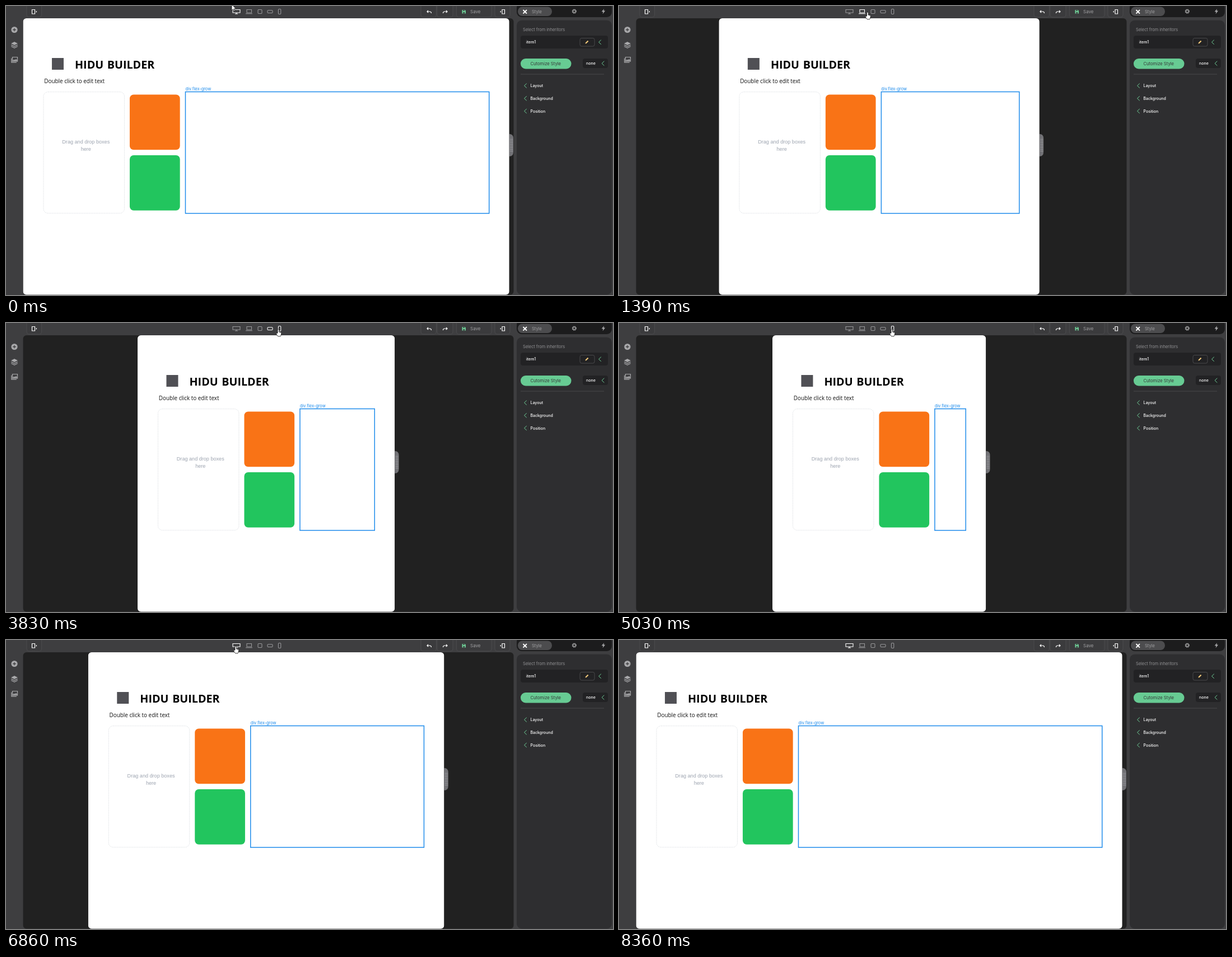
Animation, 1084 px wide and 517 px high, one loop 8870 ms. Source, as an HTML page:

```html
<!DOCTYPE html>
<html lang="en">
<head>
<meta charset="utf-8">
<title>Responsive page builder</title>
<style>
  html, body { margin: 0; height: 100%; overflow: hidden; background: #3e3e40; }
  body > svg { display: block; width: 1084px; height: 517px; font: 7.4px Inter, sans-serif; }
  .line { fill: none; stroke: #fff; stroke-width: 1.2; }
  .button rect { fill: #3b3b3d; stroke: #4a4a4c; }
  .icon { fill: #a9a9ab; }
  .outline { fill: none; stroke: #a9a9ab; stroke-width: 1.2; }
  .dark { fill: #222224; }
  .chevron { fill: none; stroke: #6fcf97; }
  .label { font-size: 7px; font-weight: 500; fill: #fff; }
  .title { font: 700 19.7px "Open Sans", sans-serif; }
  .sub { font: 9.9px "Open Sans", sans-serif; fill: #111; }
  .hint { font: 9.1px "Liberation Sans", Arial, sans-serif; fill: #9ca3af; text-anchor: middle; }
</style>
</head>
<body>
<svg viewBox="0 0 1084 517">
  <defs><path id="chev" class="chevron" d="M2.3 -4L-2 0L2.3 4"/></defs>
  <rect width="1084" height="517" fill="#3e3e40"/>
  <rect x="30.5" y="22" width="876" height="494.5" rx="6" fill="#212121"/>

  <!-- toolbar -->
  <g class="button">
    <rect x="37" y="-4" width="26.5" height="24" rx="4"/>
    <rect x="741" y="-4" width="27.5" height="24" rx="4"/>
    <rect x="770" y="-4" width="28" height="24" rx="4"/>
    <rect x="804.5" y="-4" width="62.5" height="24" rx="4"/>
    <rect x="873" y="-4" width="27" height="24" rx="4"/>
  </g>
  <g class="line">
    <path d="M46.5 6.5h5v7.5h-5zM886 6.5h4.5v7.5h-4.5z"/>
    <path d="M53 10.2l2-1.6v3.2zM882 10.2l2-1.6v3.2z" fill="#fff" stroke="none"/>
    <path d="M754 8l-2 2 2 2M752 10h5q2.5 0 2.5 3M786 8l2 2-2 2M788 10h-5q-2.5 0-2.5 3"/>
  </g>
  <path d="M814.5 7h5l1.5 1.5V13.5h-6.5z" fill="#6fcf97"/>
  <path d="M816 7.5h3v1.6h-3zM816.4 11h2.8v2.5h-2.8z" fill="#3b3b3d"/>
  <text x="829" y="13" font-size="8" fill="#a0a0a2">Save</text>
  <g id="icons" fill="none" stroke-width="1.1">
    <path d="M405 6.5h13v5.5h-13zM409 14h5M411.5 12v2"/>
    <path d="M430 6.5h8.5v5.5h-8.5zM428 13.7h12"/>
    <rect x="450" y="6.5" width="7" height="7" rx="1.2"/>
    <rect x="467" y="7.7" width="9" height="4.8" rx="1.2"/>
    <rect x="486.4" y="5.5" width="4.4" height="9" rx="1.2"/>
  </g>

  <!-- left bar -->
  <circle class="icon" cx="15" cy="42.5" r="5.6"/>
  <path d="M12.2 42.5h5.6M15 39.7v5.6" stroke="#3e3e40" stroke-width="1.3"/>
  <path class="icon" d="M15 64l6 3-6 3-6-3zM11.5 98.5l2.9-3 1.6 1.6 2-2.6 2.3 4z"/>
  <path class="outline" d="M9.3 69.6l5.7 2.8 5.7-2.8M9.3 72.3l5.7 2.8 5.7-2.8M11.5 91.5h9v7.5h-9zM9.8 93.5v7.3h9"/>

  <!-- style panel -->
  <rect x="912" y="-6" width="170" height="26" rx="9" fill="#1c1c1d"/>
  <rect x="914" y="1.5" width="61" height="16.5" rx="8" fill="#4c4c4e"/>
  <path d="M923.5 7l6.5 6.5M930 7l-6.5 6.5" stroke="#fff" stroke-width="1.8"/>
  <text x="939" y="12.8" font-size="7.5" fill="#a0a0a2">Style</text>
  <circle cx="1014.8" cy="9.5" r="3.3" fill="#777" stroke="#a0a0a2" stroke-width="1.6" stroke-dasharray="1.7 .9"/>
  <circle cx="1014.8" cy="9.5" r="1.3" fill="#1c1c1d"/>
  <path class="icon" d="M1068 5l-4.4 5.3h2.8l-.8 3.9 4.5-5.6h-2.8z"/>
  <rect x="912" y="25.5" width="170" height="491" rx="9" fill="#2e2e30"/>
  <text x="923" y="45.3" fill="#929294">Select from inheritors</text>
  <rect class="dark" x="919" y="53" width="156" height="23" rx="4"/>
  <text class="label" x="929" y="67">item1</text>
  <rect x="1025" y="57.5" width="26" height="14.5" rx="3" fill="none" stroke="#48484a"/>
  <path d="M1034.5 67.5l.5-2 3.8-3.8 1.5 1.5-3.8 3.8z" fill="#f1c879"/>
  <use href="#chev" x="1060.5" y="64.7"/>
  <rect x="919" y="94" width="90.5" height="18.5" rx="9" fill="#67cb93"/>
  <text x="936.5" y="106" font-size="7.65" fill="#343637">Cutomize Style</text>
  <rect class="dark" x="1030" y="94" width="45" height="17" rx="4"/>
  <text class="label" x="1036" y="105">none</text>
  <use href="#chev" x="1066" y="102.7"/>
  <path d="M919 122h149" stroke="#49494b"/>
  <g id="sections"></g>

  <!-- resizable page -->
  <g id="handle">
    <path d="M0 229q7.3 0 7.3 8v24q0 8-7.3 8z" fill="#727276"/>
    <path d="M3.7 238v24" stroke="#a0a0a4" stroke-width="5.5" stroke-dasharray=".8 2.2"/>
  </g>
  <svg id="page" height="517">
    <rect y="22" width="100%" height="494.5" rx="6" fill="#fff"/>
    <rect id="logo" x="51.5" width="21" height="21" fill="#505055"/>
    <text class="title" x="92.6" y="111.6">HIDU</text>
    <text class="title" id="word">BUILDER</text>
    <g id="body">
      <text class="sub" x="37.8" y="138.2">Double click to edit text</text>
      <rect id="box" x="36.5" y="153.7" height="217" rx="8" fill="none" stroke="#dfe2e6" stroke-width=".9" stroke-dasharray="2 1"/>
      <g id="right">
        <text class="hint" x="-68.7" y="246">Drag and drop boxes</text>
        <text class="hint" x="-68.7" y="259.4">here</text>
        <rect x="9.5" y="158.5" width="89.7" height="98.7" rx="7" fill="#f97316"/>
        <rect x="9.5" y="267" width="89.7" height="98.7" rx="7" fill="#22c55e"/>
        <text x="109" y="151" fill="#1f8ceb">div.flex-grow</text>
        <path id="frame" fill="none" stroke="#1f8ceb" stroke-width="1.5"/>
      </g>
    </g>
  </svg>

  <g id="cursor" fill="#fff" stroke="#111" stroke-width=".8">
    <path id="arrow" d="M0 0V11l2.5-2.3 1.6 3.6 1.6-.7-1.6-3.5H7.6z"/>
    <path id="hand" d="M-1.5 7V1.2a1.3 1.3 0 0 1 2.6 0V5l3.3.8q1 .3.9 1.3l-.7 3.5-1 2.2h-4.6l-3-4.2q-.6-1.2.6-1.2z"/>
  </g>
</svg>
<script>
const LOOP = 8870, CENTER = 464.6, EASE_MS = 200;
const STEP = 101.7, PHASE = 44; // the screen refreshes in steps

const devices = [
  { x: 411.5, width: 868.3 }, // desktop
  { x: 434, width: 572.5 },   // laptop
  { x: 453.5, width: 429.2 }, // tablet
  { x: 471.5, width: 459.3 }, // landscape phone
  { x: 488.5, width: 233.3 }  // phone
];
const visits = [
  { leave: 270, arrive: 870, click: 1165, to: 1 },
  { leave: 1190, arrive: 1500, click: 1960, to: 2 },
  { leave: 1980, arrive: 2400, click: 2791, to: 3 },
  { leave: 3410, arrive: 3830, click: 5001, to: 4 },
  { leave: 5430, arrive: 6550, click: 6801, to: 0 }
];

const $ = id => document.getElementById(id);
const set = (id, attrs) => {
  for (const k in attrs) $(id).setAttribute(k, attrs[k]);
};
const progress = (t, a, b) => Math.min(1, Math.max(0, (t - a) / (b - a)));
const mix = (a, b, u) => a + (b - a) * u;
const easeOut = u => 1 - (1 - u) ** 3;

$('sections').innerHTML = ['Layout', 'Background', 'Position'].map((name, i) => {
  const y = 142.6 + 22.7 * i;
  return `<use href="#chev" x="927.5" y="${y}"/>
    <text class="label" x="936.5" y="${y + 2.5}">${name}</text>`;
}).join('');

function layout(w) {
  const left = CENTER - w / 2;
  const boxRight = Math.min(181, w - 145.5);
  const frameW = Math.max(0, w - 145 - boxRight);
  const wrap = w < 272;
  const drop = wrap ? 23 : 0;
  set('page', { x: left, width: w });
  set('handle', { transform: `translate(${left + w})` });
  set('logo', { y: 93 + drop / 2 });
  set('word', { x: wrap ? 92.6 : 150.4, y: 111.6 + drop });
  set('body', { transform: `translate(0 ${drop})` });
  set('box', { width: boxRight - 36.5 });
  set('right', { transform: `translate(${boxRight})` });
  set('frame', { d: `M109 153.5h${frameW}v217.5h${-frameW}z` });
}

function draw(now) {
  const time = now % LOOP;
  const t = Math.max(0, PHASE + STEP * Math.floor((time - PHASE) / STEP));

  let x = 403, y = -3, active = 0, width = devices[0].width;
  for (const { leave, arrive, click, to } of visits) {
    const move = progress(t, leave, arrive);
    x = mix(x, devices[to].x - 1, move);
    y = mix(y, 11, move);
    width = mix(width, devices[to].width, easeOut(progress(t, click, click + EASE_MS)));
    if (t >= click) active = to;
  }
  const exit = progress(t, 7340, 8250);
  x = mix(x, 1057, exit);
  y = mix(y, 410, exit);
  layout(width);

  const shown = t < 100 || (t > 240 && t < 8280);
  const hand = x > 408 && y < 26;
  set('cursor', { transform: `translate(${x} ${y})`, visibility: shown ? 'visible' : 'hidden' });
  set('arrow', { display: hand ? 'none' : 'inline' });
  set('hand', { display: hand ? 'inline' : 'none' });
  [...$('icons').children].forEach((icon, i) => {
    const lit = i === active || (hand && Math.abs(x - devices[i].x) < 6);
    icon.setAttribute('stroke', lit ? '#fff' : '#98989a');
  });
}

const begin = performance.now();
function loop() {
  draw(performance.now() - begin);
  requestAnimationFrame(loop);
}
loop();
</script>
</body>
</html>
```
